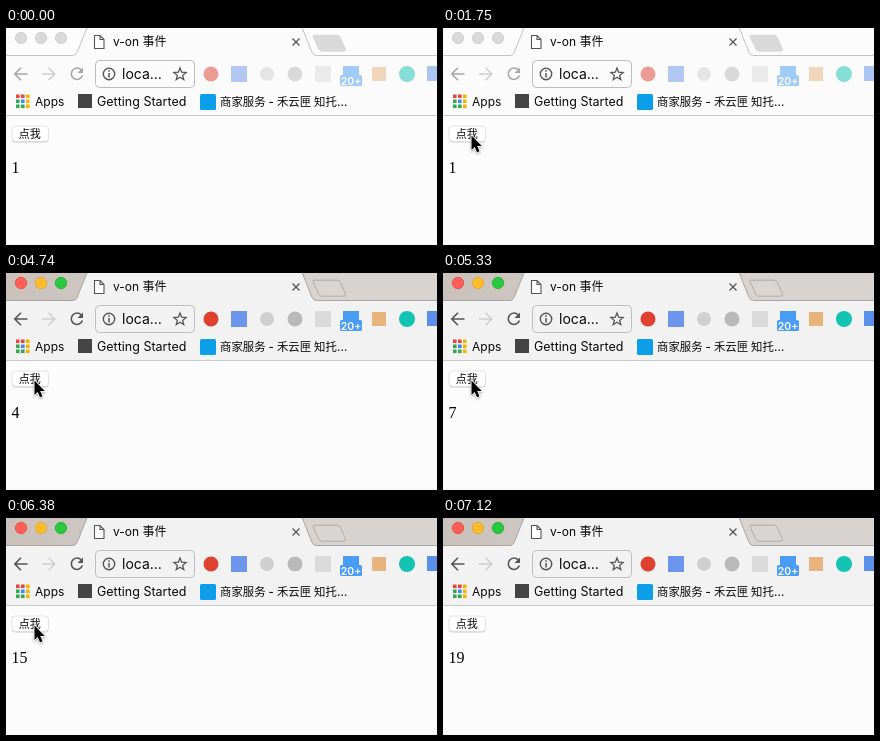
Recreate the animation shown at these times as an HTML page. Size 431 px wide and 217 px high, loop 7940 ms.

```html
<!DOCTYPE html>
<html lang="zh">
<head>
<meta charset="utf-8">
<title>v-on</title>
<style>
  html, body { margin: 0; width: 100%; height: 100%; overflow: hidden; }
  svg { display: block; width: 100vw; height: 100vh;
    --left: #fcfcfc; --right: #fcfcfc; --bar: #fbfbfb; --edge: #c4c4c4;
    --newTab: #d9d9d9; --newTabEdge: #d9d9d9; --fade: .5; }
  svg.active { --left: #cac1bb; --right: #d6d3d1; --bar: #f2f2f2; --edge: #aaa6a4;
    --newTab: #d8d5d3; --newTabEdge: #aaa6a4; --fade: 1; }
  text { font: 12px Inter, "Noto Sans CJK SC", "Noto Sans CJK", sans-serif; fill: #0a0a0a; }
  .line { fill: none; stroke: #555; stroke-width: 1.6; }
  .fade { opacity: var(--fade); }
  #lights circle { fill: #d9d9d9; stroke: #cdcdcd; stroke-width: .8; }
  .active #lights circle { fill: var(--on); stroke: var(--rim); }
  #cursor { filter: drop-shadow(0 1px 1px #0005); }
</style>
</head>
<body>
<svg id="stage" viewBox="0 0 431 217">
  <defs>
    <linearGradient id="stripFill">
      <stop stop-color="var(--left)"/><stop offset=".7" stop-color="var(--right)"/>
    </linearGradient>
  </defs>
  <rect width="431" height="217" fill="#fcfcfc"/>

  <!-- Tab strip -->
  <rect width="431" height="28" fill="url(#stripFill)"/>
  <rect y="28" width="431" height="59" fill="var(--bar)"/>
  <path d="M0 27.5H67Q70 27.5 71.3 24L81 0H296.300L305.800 24Q307.300 27.5 310.300 27.5H431V29H0Z" fill="var(--bar)"/>
  <path d="M0 27.5H67Q70 27.5 71.3 24L81 0M296.300 0L305.800 24Q307.300 27.5 310.300 27.5H431" fill="none" stroke="var(--edge)"/>
  <path transform="translate(-.7 -.3)" d="M309 7.5H332Q334 7.5 335 9.5L340 21Q341 23.500 338.500 23.500H317Q314.500 23.500 313.500 21.500L308 9.500Q307 7.500 309 7.500Z" fill="var(--newTab)" stroke="var(--newTabEdge)" stroke-width=".9"/>
  <g id="lights">
    <circle cx="15" cy="10" r="5.700" style="--on:#ff5f57;--rim:#e2463f"/>
    <circle cx="35" cy="10" r="5.700" style="--on:#ffbd2e;--rim:#e0a127"/>
    <circle cx="55" cy="10" r="5.700" style="--on:#28c940;--rim:#1eac2c"/>
  </g>
  <path d="M88.500 7.500H94L98 11.500V20.500H88.500ZM94 7.500V11.500H98" fill="#fff" stroke="#555" stroke-width="1.100"/>
  <text x="107" y="18">v-on 事件</text>
  <path class="line" style="stroke-width:1.300" d="M286.500 10.500L293.500 17.500M293.500 10.500L286.500 17.500"/>

  <!-- Toolbar -->
  <g class="line">
    <path class="fade" d="M21.500 46H9M15 39.800L8.800 46L15 52.200"/>
    <path d="M36 46H48.500M42.500 39.800L48.700 46L42.500 52.200" stroke="#cfcfcf"/>
    <g class="fade">
      <path d="M75.300 42A5.700 5.700 0 1 0 76.400 47.500"/>
      <path d="M77 39.500V45H71.500Z" fill="#555" stroke="none"/>
    </g>
  </g>
  <rect x="89.500" y="32.500" width="99" height="27" rx="4" fill="var(--bar)" stroke="#bdbdbd"/>
  <circle class="line" cx="103" cy="46" r="5.700" style="stroke-width:1.400"/>
  <path class="line" style="stroke-width:1.500" d="M103 45V49.500M103 42.300V43.800"/>
  <text x="116" y="51" style="font-size:14px">loca…</text>
  <path id="star" class="line" style="stroke-width:1.300"/>

  <!-- Extensions -->
  <g class="fade">
    <circle cx="205" cy="46" r="7.500" fill="#e0402f"/>
    <rect x="225" y="38" width="16" height="16" fill="#6c95ec"/>
    <circle cx="261" cy="46" r="7" fill="#cfcfcf"/>
    <circle cx="289" cy="46" r="7.500" fill="#b9b9b9"/>
    <rect x="309" y="38" width="16" height="16" fill="#dadada"/>
    <rect x="337" y="38" width="16" height="16" fill="#4a9df5"/>
    <rect x="334" y="47" width="22" height="11" rx="1.500" fill="#4a9df5"/>
    <text x="345" y="56.500" text-anchor="middle" style="font-size:10.500px;font-weight:600;fill:#fff">20+</text>
    <rect x="366" y="39" width="14" height="14" fill="#e6b47c"/>
    <circle cx="401" cy="46" r="8" fill="#14c4b2"/>
    <rect x="421" y="38" width="15" height="15" fill="#5b90ea"/>
  </g>

  <!-- Bookmarks -->
  <g id="apps"></g>
  <text x="29" y="78">Apps</text>
  <rect x="72" y="66" width="14" height="14" fill="#444"/>
  <text x="91" y="78" style="font-size:12.500px">Getting Started</text>
  <rect x="194" y="66" width="16" height="16" rx="1.500" fill="#0c9ee9"/>
  <text x="214" y="78" style="font-size:11.400px;font-weight:500">商家服务 - 禾云匣 知托…</text>
  <path d="M0 87.500H431" stroke="#c9c9c9"/>

  <!-- Page -->
  <rect x="6" y="99" width="36.500" height="15.500" rx="3.500" fill="#ccc"/>
  <rect x="6" y="98" width="36.500" height="15.500" rx="3.500" fill="#fff" stroke="#dcdcdc" stroke-width=".8"/>
  <text x="12.700" y="110" style="font-size:11px;font-weight:500">点我</text>
  <text id="count" x="5.500" y="145" style="font:16px 'Liberation Serif',serif;fill:#000"></text>
  <path id="cursor" d="M.5 .5V15L3.700 12L6 17.300L8.500 16.200L6.200 11H10.800Z" fill="#000" stroke="#fff" stroke-width="1.600" paint-order="stroke"/>
</svg>
<script>
const LOOP = 7940, ACTIVATE = 3550, LEAVE = 7120;
const cursorPath = [[1050, 251, 203], [1190, 153, 162], [1460, 96, 143], [1600, 29, 108], [1750, 28, 107]];
const byId = id => document.getElementById(id);
const [stage, count, cursor] = ['stage', 'count', 'cursor'].map(byId);

const starPoints = Array.from({ length: 10 }, (_, i) => {
  const radius = i % 2 ? 2.8 : 6.4, angle = i * Math.PI / 5;
  return [174 + radius * Math.sin(angle), 46.5 - radius * Math.cos(angle)];
});
byId('star').setAttribute('d', 'M' + starPoints.join('L') + 'Z');

const appColors = ['#e8453c', '#e8453c', '#f5b400', '#33a853', '#4285f4', '#f5b400', '#33a853', '#33a853', '#f5b400'];
byId('apps').innerHTML = appColors.map((color, i) =>
  `<rect x="${10 + i % 3 * 5}" y="${66.5 + Math.floor(i / 3) * 5}" width="3.6" height="3.6" fill="${color}"/>`).join('');

// The first click is single; then a steady run of clicks in two bursts.
function clicksAt(t) {
  if (t < 4150) return 1;
  if (t < 4590) return 2;
  const [first, start, last] = t < 5780 ? [3, 4590, 10] : [11, 5780, 19];
  return Math.min(first + Math.floor((t - start) / 148.5), last);
}

function draw(now) {
  const t = now % LOOP;
  stage.classList.toggle('active', t >= ACTIVATE);
  count.textContent = clicksAt(t);
  const position = cursorPath.filter(([start]) => start <= t).pop();
  const visible = position && t < LEAVE;
  cursor.style.display = visible ? '' : 'none';
  if (visible) cursor.setAttribute('transform', `translate(${position[1]} ${position[2]})`);
}

const started = performance.now();
function tick() {
  draw(performance.now() - started);
  requestAnimationFrame(tick);
}
tick();
</script>
</body>
</html>
```
